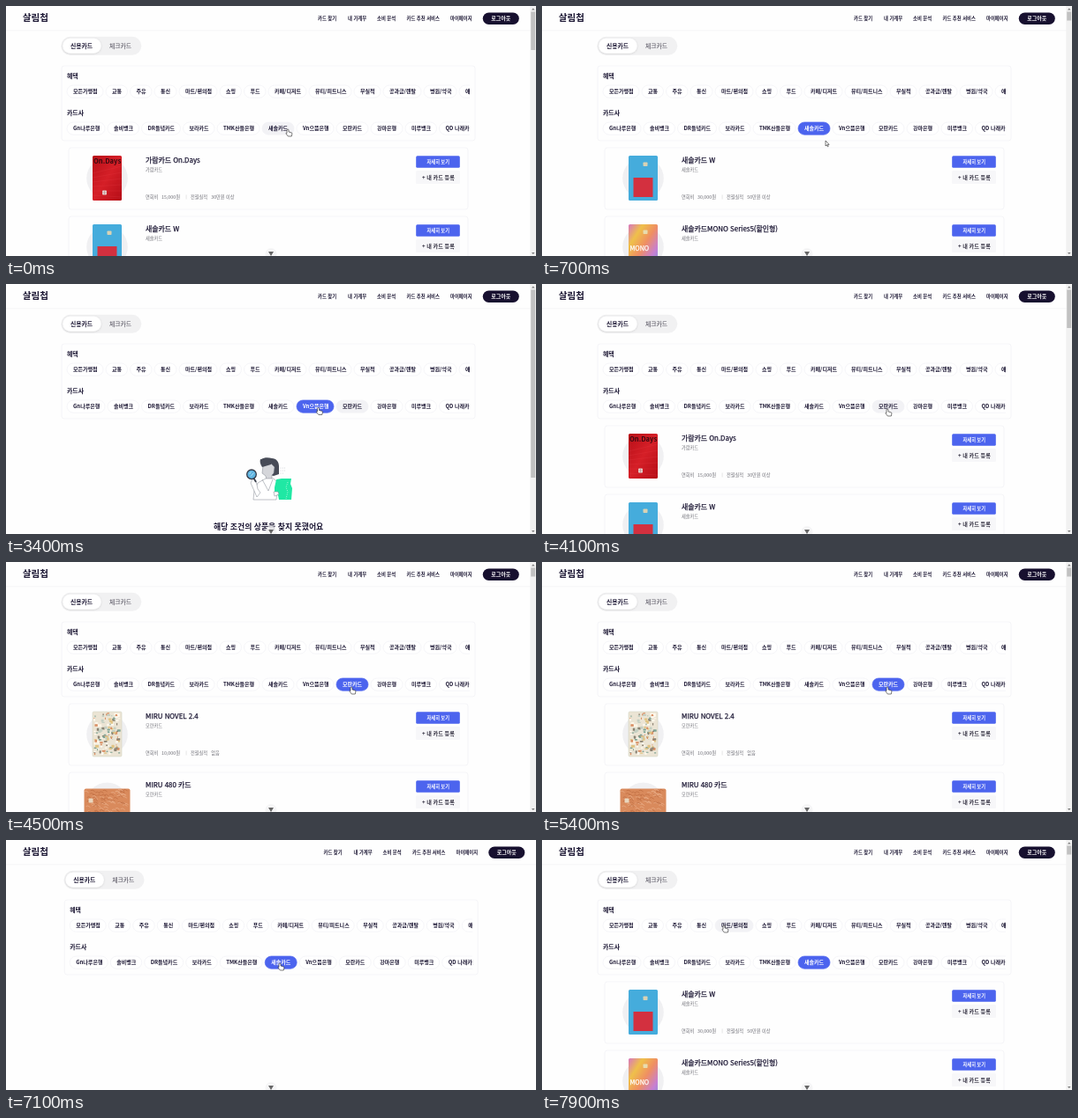
An HTML page for the animation above (8 s loop, 600 by 284 pixels).

```html
<!DOCTYPE html>
<html lang="ko">
<head>
<meta charset="utf-8">
<style>
html, body { margin: 0; width: 100%; height: 100%; overflow: hidden; background: #fefefe; }
svg { display: block; width: 600px; height: 284px; font-family: "Noto Sans CJK KR", "Noto Sans CJK", "Noto Sans KR", sans-serif; }
text { white-space: pre; }
</style>
</head>
<body>
<svg id="stage" viewBox="0 0 600 284"></svg>
<script>
const INK = '#1b1633', BLUE = '#4c64ee', LINE = '#f1f1f5';

// Weight 500 is drawn as regular with a thin stroke
const text = (x, y, size, str, fill = INK, weight = 700) =>
  `<text x="${x}" y="${y}" font-size="${size}" fill="${fill}" font-weight="${weight === 500 ? 400 : weight}"` +
  `${weight === 500 ? ` stroke="${fill}" stroke-width=".25"` : ''}>${str}</text>`;
const rect = (x, y, w, h, fill, rx = 0, extra = '') =>
  `<rect x="${x}" y="${y}" width="${w}" height="${h}" rx="${rx}" fill="${fill}" ${extra}/>`;
const path = (d, fill, extra = '') => `<path d="${d}" fill="${fill}" ${extra}/>`;
const outline = `stroke="${LINE}" stroke-width=".7"`;

function random(seed) {
  return () => (seed = (seed * 16807) % 2147483647) / 2147483647;
}

// Filter pills: label and left edge of the text
const benefits = [['모든가맹점', 76], ['교통', 120], ['주유', 147.5], ['통신', 175], ['마트/편의점', 203],
  ['쇼핑', 249], ['푸드', 276.5], ['카페/디저트', 304], ['뷰티/피트니스', 350], ['무실적', 401],
  ['공과금/렌탈', 434], ['병원/약국', 480], ['애완동물', 520]];
const issuers = [['Gn나루은행', 76], ['솔비뱅크', 122], ['DR들녘카드', 160.5], ['보라카드', 207.5], ['TMK산들은행', 246],
  ['새솔카드', 297], ['Vn으뜸은행', 336], ['모란카드', 381], ['강마은행', 420], ['미루뱅크', 459], ['QD 나래카드', 497.5]];
const MART = 4, SAESOL = 18, VN = 19, MORAN = 20;

const pillRow = (row, y) => row.map(([label, x], i) => {
  const w = (row[i + 1] ? row[i + 1][1] : x + 48) - x - 3;
  return `<g class="pill">${rect(x - 7, y - 7, w, 14.2, '#fff', 7.1, outline)}${text(x, y + 2.2, 6, label)}</g>`;
}).join('');

// Card faces, drawn in a 33 x 51 (or 52 x 33) box
function redFace() {
  let s = rect(0, 0, 33, 51, 'url(#red)', 1.5);
  for (let i = 0; i < 6; i++)
    s += path(`M0 ${20 + i * 5}L${33} ${12 + i * 7}`, 'none', 'stroke="#e8434a" stroke-width=".4" opacity=".5"');
  return s + text(1, 9, 7.6, 'On.Days', '#3b0a10') + rect(11, 39.5, 5, 5, '#e6d3cf', 1) +
    path('M11 42h5M13.5 39.5v5', 'none', 'stroke="#a66" stroke-width=".4"');
}
function blueFace() {
  return rect(0, 0, 33, 51, '#45acdc', 1.5) + rect(16.5, 7.5, 5, 4.5, '#d8d2b4', .8) +
    rect(5.5, 25, 22, 22, '#d3303f');
}
function rainbowFace() {
  return rect(0, 0, 33, 51, 'url(#rainbow)', 1.5) + rect(16.5, 6.5, 5, 4.5, '#e8dcae', .8) +
    text(1.5, 30, 7.2, 'MONO', '#fff', 500);
}
function patternFace() {
  const rnd = random(77), tones = ['#d98d62', '#7fa394', '#fffaf0', '#e0c383', '#8b8272', '#fff8ea', '#c4cfc2'];
  let s = rect(0, 0, 33, 51, '#ebe4d4', 1.5, 'stroke="#cfd0bd" stroke-width=".5"');
  for (let i = 0; i < 140; i++)
    s += rect(1 + rnd() * 28, 1 + rnd() * 46, 1 + rnd() * 3, .8 + rnd() * 2.6, tones[i % 7], .4);
  return s;
}
function copperFace() {
  const rnd = random(31);
  let s = rect(0, 0, 52, 33, '#d98a5c', 2);
  for (let i = 0; i < 90; i++)
    s += path(`M${rnd() * 46} ${1 + rnd() * 30}q2-2 5 1`, 'none', `stroke="${i % 2 ? '#bd6c41' : '#ebb18b'}" stroke-width=".7"`);
  return s + rect(5, 11, 5, 5, '#e9d6bd', 1);
}

function item(row, title, issuer, face, fee, spend, wide) {
  const gray = '#707078';
  return `<g transform="translate(0 ${row * 78})">` +
    rect(71, 161, 452, 70, '#fefefe', 3, outline) +
    `<circle cx="114.5" cy="195.7" r="23.3" fill="#f0f0f2"/>` +
    `<g transform="translate(${wide ? '88.5 179.5' : '98 170'})">${face}</g>` +
    text(158, 178, 7.9, title, INK, 500) + text(158, 188.3, 5.2, issuer, gray, 400) +
    text(158, 219.3, 5.2, '연회비', gray, 400) + text(176, 219.3, 5.3, fee, gray, 400) +
    rect(203.8, 214.5, .5, 5, '#ccc') +
    text(209, 219.3, 5.2, '전월실적', gray, 400) + text(232.3, 219.3, 5.2, spend, gray, 400) +
    rect(464.2, 170.2, 49.6, 13.6, BLUE, 1.5) + text(476.6, 179, 5.2, '자세히 보기', '#fff') +
    rect(464, 187, 50, 15, '#f7f7f9', 1.5) + text(471, 196.8, 6.1, '+ 내 카드 등록', '#2a2738') + '</g>';
}

const saesol = row => item(row, '새솔카드 W', '새솔카드', blueFace(), '30,000원', '50만원 이상');

function emptyPage() {
  const pen = 'stroke="#7d828c" stroke-width=".5"';
  let dots = '';
  for (let i = 0; i < 8; i++)
    dots += `<circle cx="${311 + (i % 3) * 2.2}" cy="${209 + Math.floor(i / 3) * 3}" r=".4" fill="#a4a8b0"/>`;
  return path('M289 199c3-2 8-2 12-1 5 0 8 4 8 9v9l-6 2-8-2z', '#474b57') +
    path('M291 206l9-2 4 4-1 7-2 2v5l-6 1-1-5-4-3z', '#d5d6da', pen) +
    path('M288 199l14 1-2 5-10 3c-2-3-3-6-2-9z', '#474b57') +
    path('M280 245l1-10 4-9 9-5 9 0 5 5-2 19z', '#fff', pen) +
    path('M281 235l-4-9 3-6 3 3 2 10 3 4-4 5z', '#fff', pen) +
    path('M290 222l7 13 5-13', 'none', pen) +
    path('M280 220l3 5', 'none', 'stroke="#3a3f4b" stroke-width="1.6"') +
    `<circle cx="278" cy="216.3" r="5.3" fill="#5fb4e0" stroke="#343946" stroke-width="1.3"/>` +
    path('M275.5 216l2-2.5M277 218.5l3.5-4', 'none', 'stroke="#d9f1fb" stroke-width=".7"') +
    path('M306 222l6-1 11 0-1 6 2 5-1 13-14 0-1-5-4 0 0-9z', '#20e8a4') +
    path('M303 236l5 0 1 3-5 2z', '#fff', pen) +
    path('M319 225l-2 6 2 5-2 8', 'none', 'stroke="#fff" stroke-width=".6" stroke-dasharray="1 1.4"') + dots +
    text(235, 278.7, 8.88, '해당 조건의 상품을 찾지 못했어요');
}

const pages = {
  all: item(0, '가람카드 On.Days', '가람카드', redFace(), '15,000원', '30만원 이상') + saesol(1),
  saesol: saesol(0) + item(1, '새솔카드MONO Series5(할인형)', '새솔카드', rainbowFace(), '10,000원', '없음'),
  moran: item(0, 'MIRU NOVEL 2.4', '모란카드', patternFace(), '10,000원', '없음') +
    item(1, 'MIRU 480 카드', '모란카드', copperFace(), '20,000원', '50만원 이상', true),
  none: emptyPage(),
  load: ''
};
const thumbs = { all: 43.5, saesol: 10, moran: 10, none: 213.5, load: 0 };

const stops = colors => colors.map((c, i) => `<stop offset="${i / (colors.length - 1)}" stop-color="${c}"/>`).join('');
const nav = [['카드 찾기', 353], ['내 가계부', 387], ['소비 분석', 420], ['카드 추천 서비스', 453.5], ['마이페이지', 503]];

document.getElementById('stage').innerHTML = `
<defs>
  <linearGradient id="red" x2="1" y2="1">${stops(['#b80f18', '#d51f27', '#b50d17'])}</linearGradient>
  <linearGradient id="rainbow" x2="1" y2="1">${stops(['#d877c0', '#efc04a', '#ef8f62', '#c77fd2', '#6c9be0'])}</linearGradient>
  <clipPath id="clip"><rect x="68" y="80" width="457" height="70"/></clipPath>
  <filter id="soft" x="-20%" y="-40%" width="140%" height="180%"><feDropShadow dx="0" dy=".5" stdDeviation="1" flood-opacity=".15"/></filter>
</defs>
${rect(0, 0, 600, 284, '#fefefe')}
${rect(0, 27.6, 600, .6, '#eeeef1')}
${text(18.7, 17, 10.6, '살림첩')}
<g id="nav">${nav.map(([s, x]) => text(x, 15.5, 5.35, s)).join('')}
  ${rect(539.8, 7.5, 41, 13.4, '#17102f', 6.7)}${text(549.3, 16.3, 6, '로그아웃', '#fff')}</g>
<g id="main">
  ${rect(62.3, 34.8, 91, 21, '#f1f1f2', 10.5)}
  ${rect(64.3, 36.8, 43.3, 17, '#fff', 8.5, 'filter="url(#soft)"')}
  ${text(73, 47.5, 6.8, '신용카드')}${text(117, 47.5, 6.8, '체크카드', '#44414f', 400)}
  ${rect(63, 68, 468, 85, '#fefefe', 3, outline)}
  ${text(69, 81.5, 6.9, '혜택')}${text(69, 123.6, 6.9, '카드사')}
  <g clip-path="url(#clip)">${pillRow(benefits, 97)}${pillRow(issuers, 139)}</g>
  ${Object.entries(pages).map(([id, body]) => `<g id="${id}">${body}</g>`).join('')}
</g>
<g id="bar">${rect(593.3, 0, 6.7, 284, '#f1f1f1')}
  <rect id="thumb" x="594.2" y="6.5" width="5" fill="#c1c1c1"/>
  ${path('M595 4.5h3.6l-1.8-2z', '#777')}${path('M595 280h3.6l-1.8 2z', '#777')}</g>
<circle cx="300" cy="281.5" r="6.5" fill="#f3f3f5" opacity=".85"/>
${path('M297 279h6l-3 5z', '#666')}
<g id="hand">${path('M0 0c.8 0 1 .5 1 1v2l3 .8c.7.2 1 .6.9 1.3l-.6 2.9h-4l-2.3-3c-.3-.6.4-1 .9-.6l.1.1v-3.5c0-.5.3-1 1-1z', '#fff', 'stroke="#222" stroke-width=".6"')}</g>
<g id="arrow">${path('M0 0v6l1.4-1.2 1 2 .8-.4-.9-2h1.8z', '#fff', 'stroke="#222" stroke-width=".6"')}</g>`;

// Time, page, selected pill, hovered pill
const states = [
  [0, 'all', -1, SAESOL], [200, 'load', SAESOL, -1], [500, 'saesol', SAESOL, -1],
  [1400, 'load', -1, SAESOL], [1700, 'all', -1, SAESOL], [2080, 'all', -1, VN],
  [2300, 'none', VN, -1], [2950, 'none', VN, MORAN], [3450, 'none', VN, -1],
  [3700, 'load', -1, VN], [3900, 'all', -1, VN], [4050, 'all', -1, MORAN],
  [4200, 'load', MORAN, -1], [4400, 'moran', MORAN, -1],
  [5900, 'load', -1, MORAN], [6200, 'all', -1, MORAN], [6550, 'all', -1, VN], [6700, 'all', -1, SAESOL],
  [7100, 'load', SAESOL, -1], [7400, 'saesol', SAESOL, -1], [7800, 'saesol', SAESOL, MART]
];
// Time, x, y of the pointer tip
const moves = [
  [0, 319, 140], [350, 319, 140], [600, 321, 153], [1100, 321, 153], [1300, 317.5, 143], [1900, 317.5, 143],
  [2150, 350, 141], [2700, 350, 141], [3000, 385, 142], [3250, 385, 142], [3400, 353.5, 140.5],
  [3850, 353.5, 140.5], [4100, 391, 142], [6400, 391, 142], [6800, 310, 140], [7400, 310, 140],
  [7850, 206, 97], [8000, 206, 97]
];

const get = id => document.getElementById(id);
const show = (id, on) => get(id).setAttribute('display', on ? 'inline' : 'none');
const shift = (id, x, y = 0) => get(id).setAttribute('transform', `translate(${x} ${y})`);
const pills = [...document.querySelectorAll('.pill')];

function pointer(t) {
  const i = moves.findIndex(m => m[0] > t), [t0, x0, y0] = moves[i - 1], [t1, x1, y1] = moves[i];
  const p = (t - t0) / (t1 - t0), k = p * p * (3 - 2 * p);
  return [x0 + (x1 - x0) * k, y0 + (y1 - y0) * k];
}

function draw(now) {
  const t = now % 8000;
  const [, page, selected, hovered] = states.filter(s => s[0] <= t).pop();
  const loading = page === 'load';
  for (const id in pages) show(id, id === page);
  show('bar', !loading);
  get('thumb').setAttribute('height', thumbs[page]);
  shift('nav', loading ? 6.5 : 0);
  shift('main', loading ? 3.2 : 0);
  pills.forEach((pill, i) => {
    const on = i === selected;
    pill.firstChild.setAttribute('fill', on ? BLUE : i === hovered ? '#f2f2f5' : '#fff');
    pill.firstChild.setAttribute('stroke', on ? BLUE : LINE);
    pill.lastChild.setAttribute('fill', on ? '#fff' : INK);
  });
  const [x, y] = pointer(t), isArrow = y > 147.5 || (y > 105 && y < 132);
  show('arrow', isArrow);
  show('hand', !isArrow);
  shift(isArrow ? 'arrow' : 'hand', x, y);
}

const start = performance.now();
function tick() {
  draw(performance.now() - start);
  requestAnimationFrame(tick);
}
tick();
</script>
</body>
</html>
```
